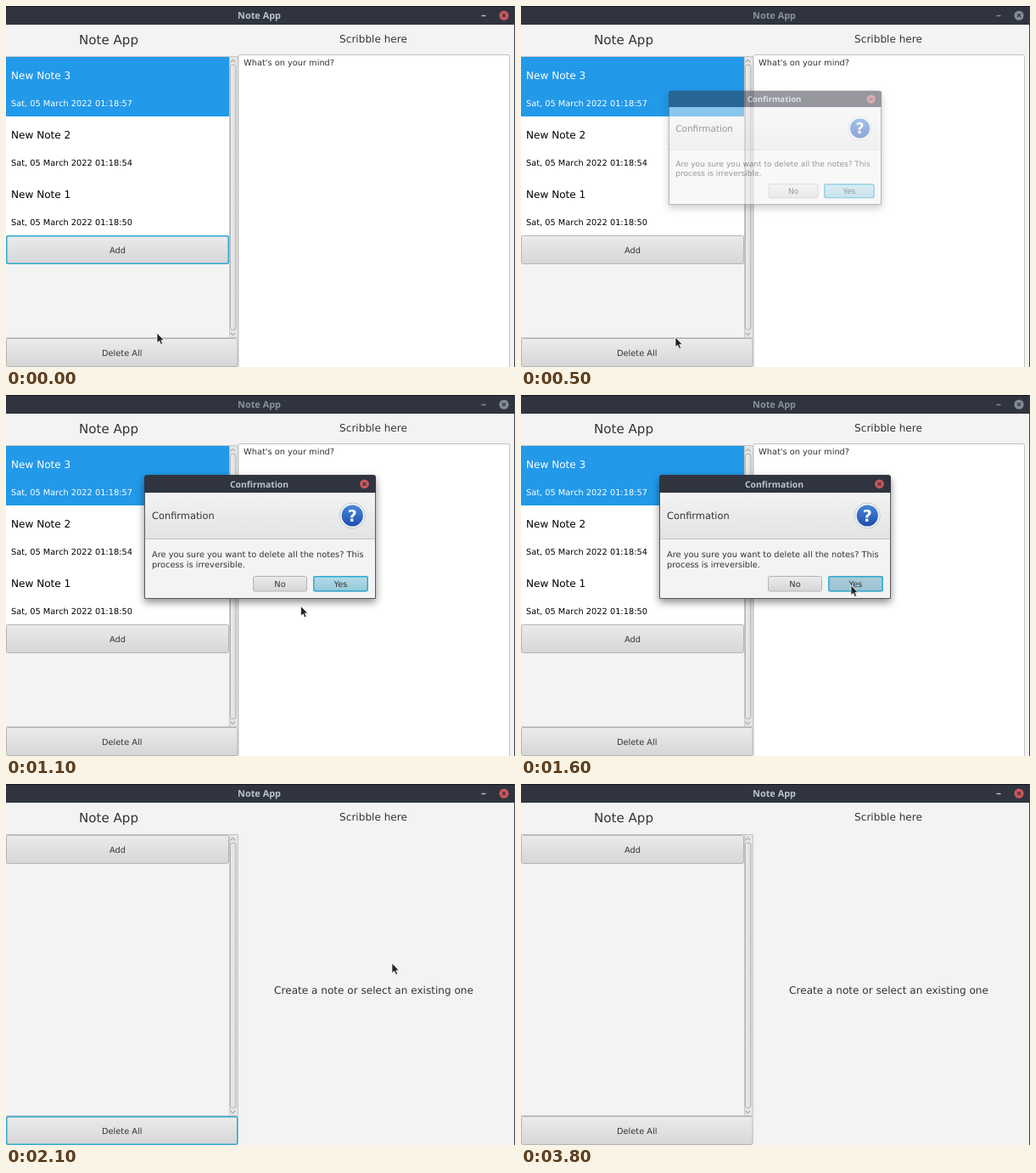
These frames come from a looping animation (600 by 425 pixels, 4700 ms). An HTML page:

```html
<!DOCTYPE html>
<html lang="en">
<head>
<meta charset="utf-8">
<title>Note App</title>
<style>
  html, body { margin: 0; width: 100%; height: 100%; overflow: hidden; background: #f3f3f3; }
  svg { display: block; }
  text { font-family: "DejaVu Sans", sans-serif; font-size: 9.8px; fill: #333; text-rendering: geometricPrecision; }
  .mid { text-anchor: middle; }
  .bar { font-family: "Noto Sans", sans-serif; font-weight: bold; fill: #bcc3cf; text-anchor: middle; }
  .large { font-size: 12.08px; }
  .heading { font-size: 15.1px; }
  .note text { fill: #000; }
  .selected text { fill: #fff; }
  .ring { fill: none; stroke: #2fa9cf; stroke-width: 1.5; }
  .chevron { fill: none; stroke: #888; }
  #dialog { transform-origin: 299.5px 167px; }
</style>
</head>
<body>
<svg id="stage" width="600" height="425" viewBox="0 0 600 425"></svg>
<script>
const LOOP = 4700, STEP = 100;

// Pointer positions: time, x, y
const pointerPath = [
  [0, 178, 385], [100, 174, 395], [200, 168, 409], [300, 167, 412], [400, 167, 412],
  [500, 182, 390], [600, 230, 320], [700, 285, 281], [800, 285, 281], [1000, 325, 262],
  [1200, 370, 235], [1400, 389, 224], [2000, 389, 224], [2100, 455, 211], [2200, 521, 197]
];

const rect = (x, y, w, h, fill, extra = '') =>
  `<rect x="${x}" y="${y}" width="${w}" height="${h}" fill="${fill}" ${extra}/>`;

const label = (x, y, content, cls = '', extra = '') =>
  `<text x="${x}" y="${y}" class="${cls}" ${extra}>${content}</text>`;

const gradient = (id, from, to, direction = 'x2="0" y2="1"') =>
  `<linearGradient id="${id}" ${direction}><stop stop-color="${from}"/><stop offset="1" stop-color="${to}"/></linearGradient>`;

const button = (id, x, y, w, h, content, fill = 'url(#face)') => `<g id="${id}">
  ${rect(x + .5, y + .5, w - 1, h - 1, fill, 'rx="2" stroke="#b4b4b4" class="face"')}
  ${rect(x + .75, y + .75, w - 1.5, h - 1.5, 'none', 'rx="2" class="ring"')}
  ${label(x + w / 2, y + h / 2 + 3.6, content, 'mid')}</g>`;

const closeButton = (id, x, y, r) => `<circle id="${id}" cx="${x}" cy="${y}" r="${r}" fill="#cc575d"/>
  <path d="M${x - 2} ${y - 2}l4 4m0-4l-4 4" stroke="#2f343f" stroke-width="1.2"/>`;

const note = (number, y, seconds) => `<g class="note ${number === 3 ? 'selected' : ''}">
  ${rect(0, y, 263, 70, number === 3 ? '#2299e9' : '#fff')}
  ${label(6, y + 26, `New Note ${number}`, 'large')}
  ${label(6, y + 57.6, `Sat, 05 March 2022 01:18:${seconds}`)}</g>`;

const stage = document.getElementById('stage');
stage.innerHTML = `
  <defs>
    ${gradient('face', '#ebebeb', '#d6d6d6')}
    ${gradient('accent', '#b4dce9', '#95c8da')}
    ${gradient('accentHover', '#a9cbd8', '#9bc3d2')}
    ${gradient('header', '#f3f3f3', '#e3e3e3')}
    ${gradient('thumb', '#f0f0f0', '#dadada', 'x2="1" y2="0"')}
    ${gradient('blue', '#4a86d8', '#1f4fae')}
  </defs>
  ${rect(0, 0, 600, 425, '#f3f3f3')}
  ${rect(0, 0, 600, 22, '#2f343f')}
  ${rect(0, 0, 600, 1, '#15171b')}
  ${label(298.5, 15, 'Note App', 'bar', 'id="title" style="font-size:10.9px"')}
  <path id="minimize" d="M560.5 11.5h5" stroke="#bcc3cf" stroke-width="1.4"/>
  ${closeButton('close', 587, 11.2, 5.6)}
  ${label(121, 44.5, 'Note App', 'heading mid')}
  ${label(433, 43, 'Scribble here', 'large mid')}

  <path d="M0 59.5H273.5V391" fill="none" stroke="#c6c6c6"/>
  ${rect(263, 60, 10, 331, '#e4e4e4')}
  <path d="M263.5 60V391" stroke="#c9c9c9"/>
  ${rect(264.5, 69.5, 6.5, 311.5, 'url(#thumb)', 'rx="2" stroke="#b0b0b0"')}
  <path class="chevron" d="M264.5 66.2l2.8-2.7 2.8 2.7M264.5 384.8l2.8 2.7 2.8-2.7"/>
  <g id="notes">
    ${note(3, 60, 57)}${note(2, 130, 54)}${note(1, 200, 50)}
    ${rect(274, 57.5, 319.5, 380, '#fff', 'rx="2" stroke="#c2c2c2"')}
    ${label(280, 70, "What's on your mind?")}
  </g>
  ${label(433.5, 246.6, 'Create a note or select an existing one', 'large mid', 'id="empty"')}
  ${button('add', 0, 0, 263, 34, 'Add')}
  <path d="M0 390.5H273" stroke="#c6c6c6"/>
  ${button('deleteAll', 0, 391, 273.5, 34, 'Delete All')}
  ${rect(599, 0, 1, 425, '#3a3d42')}

  <g id="dialog">
    ${rect(163, 100, 273, 140, '#f3f3f3')}
    <path d="M163 115V97q0-3 3-3H433q3 0 3 3V115Z" fill="#2f343f"/>
    ${label(298.5, 108.5, 'Confirmation', 'bar', 'style="font-size:10.4px"')}
    ${closeButton('dialogClose', 422.5, 104.8, 5.4)}
    ${rect(164, 115, 271, 54, 'url(#header)')}
    <path d="M163 169.5H436" stroke="#c4c4c4"/>
    ${label(172, 146, 'Confirmation', '', 'style="font-size:11.4px"')}
    <circle cx="408.3" cy="142" r="15" fill="#f4f6f8" stroke="#c3c8cf"/>
    <circle cx="408.3" cy="142" r="12.6" fill="url(#blue)"/>
    ${label(408.3, 149, '?', 'mid', 'style="font-size:19px;font-weight:bold;fill:#fff"')}
    ${label(172, 191, 'Are you sure you want to delete all the notes? This')}
    ${label(172, 202.8, 'process is irreversible.')}
    ${button('no', 291, 213, 64, 18.5, 'No')}
    ${button('yes', 362, 213, 65, 18.5, 'Yes', 'url(#accent)')}
    <path d="M163.5 115V239.5H435.5V115" fill="none" stroke="#555a63"/>
  </g>
  <path id="pointer" d="M0 0V11.6L2.7 9.2 4.6 13.4 6.6 12.5 4.8 8.4H8.2Z" fill="#222" stroke="#fff" stroke-width=".7"/>`;

const el = id => document.getElementById(id);
const show = (node, visible) => node.style.display = visible ? '' : 'none';
const ring = id => el(id).querySelector('.ring');

function pointerAt(t) {
  const next = pointerPath.findIndex(p => p[0] > t);
  if (next < 0) return pointerPath.at(-1).slice(1);
  const [t0, x0, y0] = pointerPath[next - 1], [t1, x1, y1] = pointerPath[next];
  const k = (t - t0) / (t1 - t0);
  return [x0 + (x1 - x0) * k, y0 + (y1 - y0) * k];
}

function render(t) {
  const cleared = t >= 1700;
  const modal = t >= 500 && !cleared;

  show(el('notes'), !cleared);
  show(el('empty'), cleared);
  el('add').setAttribute('transform', `translate(0 ${cleared ? 60 : 270})`);
  show(ring('add'), t < 300);
  show(ring('deleteAll'), t >= 300 && t < 3800 && !modal);
  show(ring('no'), false);

  el('title').style.fill = modal ? '#8b919d' : '';
  el('minimize').setAttribute('stroke', modal ? '#8b919d' : '#bcc3cf');
  el('close').setAttribute('fill', modal ? '#858b96' : '#cc575d');

  // The dialog grows in, then shrinks and fades away.
  const [opacity, scale] = t === 500 ? [.5, .92] : t === 1700 ? [.1, .824] : [1, 1];
  const dialog = el('dialog');
  show(dialog, t >= 500 && t < 1800);
  dialog.style.opacity = opacity;
  dialog.style.transform = `scale(${scale})`;
  dialog.style.filter = cleared ? 'none' : `drop-shadow(0 4px 5px rgba(0,0,0,${t < 700 ? .38 : .45}))`;
  el('yes').querySelector('.face').setAttribute('fill', t >= 1300 ? 'url(#accentHover)' : 'url(#accent)');

  show(el('pointer'), t < 2500);
  el('pointer').setAttribute('transform', `translate(${pointerAt(t)})`);
}

const start = performance.now();
function tick() {
  const t = (performance.now() - start) % LOOP;
  render(Math.floor(t / STEP) * STEP);
  requestAnimationFrame(tick);
}
tick();
</script>
</body>
</html>
```
